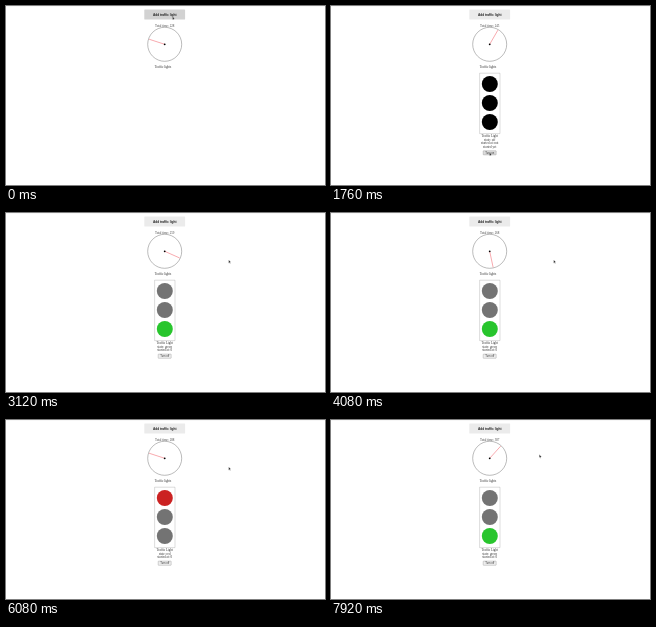
Write an HTML page with a canvas that moves like this. It is 319 by 179 pixels and loops after 8 s.

```html
<!DOCTYPE html>
<html lang="en">
<head>
<meta charset="utf-8">
<title>Traffic light simulation</title>
<style>
  html, body { margin: 0; width: 100%; height: 100%; overflow: hidden; background: #fff; }
  canvas { display: block; width: 100vw; height: 100vh; }
</style>
</head>
<body>
<canvas></canvas>
<script>
const canvas = document.querySelector('canvas');
const ctx = canvas.getContext('2d');
const W = 319, H = 179, LOOP = 8000, CENTER = 158.7;
const FIRST_TICK = 228, TICK_MS = 100;
const SERIF = '"Liberation Serif", serif', SANS = '"Liberation Sans", sans-serif';

const ADDED = 320, TURNED_ON = 1860;
const PHASES = [[1860, 'green'], [4800, 'yellow'], [5800, 'red'], [7750, 'green']];
const LAMPS = [['red', '#cb2222', 78], ['yellow', '#e8a80c', 97], ['green', '#28c52d', 116]];

// Pointer stops: time, x, y
const POINTER = [
  [0, 166.5, 10.5], [320, 166.5, 10.5], [950, 158.5, 146.5], [1900, 158.5, 146.5],
  [2650, 222.7, 47], [6160, 222.7, 47], [6560, 208.3, 34.6], [LOOP, 208.3, 34.6]
];

function pointerAt(t) {
  const i = POINTER.findIndex(stop => stop[0] > t);
  const [t0, x0, y0] = POINTER[i - 1], [t1, x1, y1] = POINTER[i];
  const p = (t - t0) / (t1 - t0), eased = p * p * (3 - 2 * p);
  return [x0 + (x1 - x0) * eased, y0 + (y1 - y0) * eased];
}

// Text is set at page size and reduced, so small glyphs keep their spacing
function text(string, y, { size = 16, family = SERIF, weight = '', x = CENTER, align = 'center', color = '#333' } = {}) {
  ctx.save();
  ctx.translate(x, y);
  ctx.scale(0.2, 0.2);
  ctx.font = `${weight} ${size}px ${family}`;
  ctx.textAlign = align;
  ctx.textBaseline = 'alphabetic';
  ctx.fillStyle = color;
  ctx.fillText(string, 0, 0);
  ctx.restore();
}

function disc(x, y, r, fill) {
  ctx.beginPath();
  ctx.arc(x, y, r, 0, 2 * Math.PI);
  if (fill) { ctx.fillStyle = fill; ctx.fill(); }
}

function box(x, y, w, h, radius, fill, stroke) {
  ctx.beginPath();
  ctx.roundRect(x, y, w, h, radius);
  if (fill) { ctx.fillStyle = fill; ctx.fill(); }
  if (stroke) { ctx.strokeStyle = stroke; ctx.stroke(); }
}

function drawClock(ticks) {
  text('Total time: ' + ticks, 20.6, { color: '#444' });
  ctx.lineWidth = 0.5;
  ctx.strokeStyle = '#777';
  disc(CENTER, 38.3, 17);
  ctx.stroke();

  const angle = ticks * 6 * Math.PI / 180;
  ctx.beginPath();
  ctx.moveTo(CENTER, 38.3);
  ctx.lineTo(CENTER + 16.4 * Math.sin(angle), 38.3 - 16.4 * Math.cos(angle));
  ctx.strokeStyle = '#f0555f';
  ctx.stroke();
  disc(CENTER, 38.3, 0.9, '#000');
}

function drawTrafficLight(t) {
  const on = t >= TURNED_ON;
  const state = on ? PHASES.filter(phase => phase[0] <= t).pop()[1] : 'off';
  ctx.lineWidth = 0.3;
  box(148.6, 67.2, 20.4, 60.4, 0, '#fff', '#888');
  for (const [name, color, y] of LAMPS)
    disc(158.8, y, 8, !on ? '#000' : name === state ? color : '#737373');

  const lines = on
    ? ['Traffic Light', 'state: ' + state, 'started at: 0']
    : ['Traffic Light', 'state: off', 'started at: not', 'started yet'];
  lines.forEach((line, i) => text(line, 130.9 + 3.6 * i));

  const y = 130.3 + 3.6 * lines.length, [px, py] = pointerAt(t);
  const hover = Math.abs(px - CENTER) < 6.5 && py > y && py < y + 4.2;
  box(152.2, y, 13, 4.2, 0.5, hover ? '#ddd' : '#eee', '#777');
  text(on ? 'Turn off' : 'Turn on', y + 3, { size: 13.3, family: SANS });
}

function drawPointer(x, y) {
  ctx.beginPath();
  [[0, 0], [0, 3.2], [0.75, 2.5], [1.25, 3.6], [1.75, 3.4], [1.25, 2.3], [2.3, 2.3]]
    .forEach(([dx, dy]) => ctx.lineTo(x + dx, y + dy));
  ctx.closePath();
  ctx.lineWidth = 0.3;
  ctx.strokeStyle = '#fff';
  ctx.fillStyle = '#111';
  ctx.fill();
  ctx.stroke();
}

function draw(t) {
  const ratio = window.devicePixelRatio || 1;
  const width = Math.round(innerWidth * ratio), height = Math.round(innerHeight * ratio);
  if (canvas.width !== width || canvas.height !== height) {
    canvas.width = width;
    canvas.height = height;
  }
  ctx.setTransform(width / W, 0, 0, height / H, 0, 0);
  ctx.fillStyle = '#fff';
  ctx.fillRect(0, 0, W, H);
  ctx.fillStyle = '#eee';
  ctx.fillRect(0, 0, W, 0.5);

  const [x, y] = pointerAt(t);
  box(138.3, 3.4, 40.8, 10.2, 0.6, y < 13.6 ? '#d2d2d2' : '#ebebeb');
  text('Add traffic light', 9.7, { family: SANS, weight: 'bold', color: '#222' });
  drawClock(FIRST_TICK + Math.floor(t / TICK_MS));
  text('Traffic lights', 62.1, { x: 148.7, align: 'left' });
  if (t >= ADDED) drawTrafficLight(t);
  drawPointer(x, y);
}

const start = performance.now();
function frame() {
  draw((performance.now() - start) % LOOP);
  requestAnimationFrame(frame);
}
frame();
</script>
</body>
</html>
```
